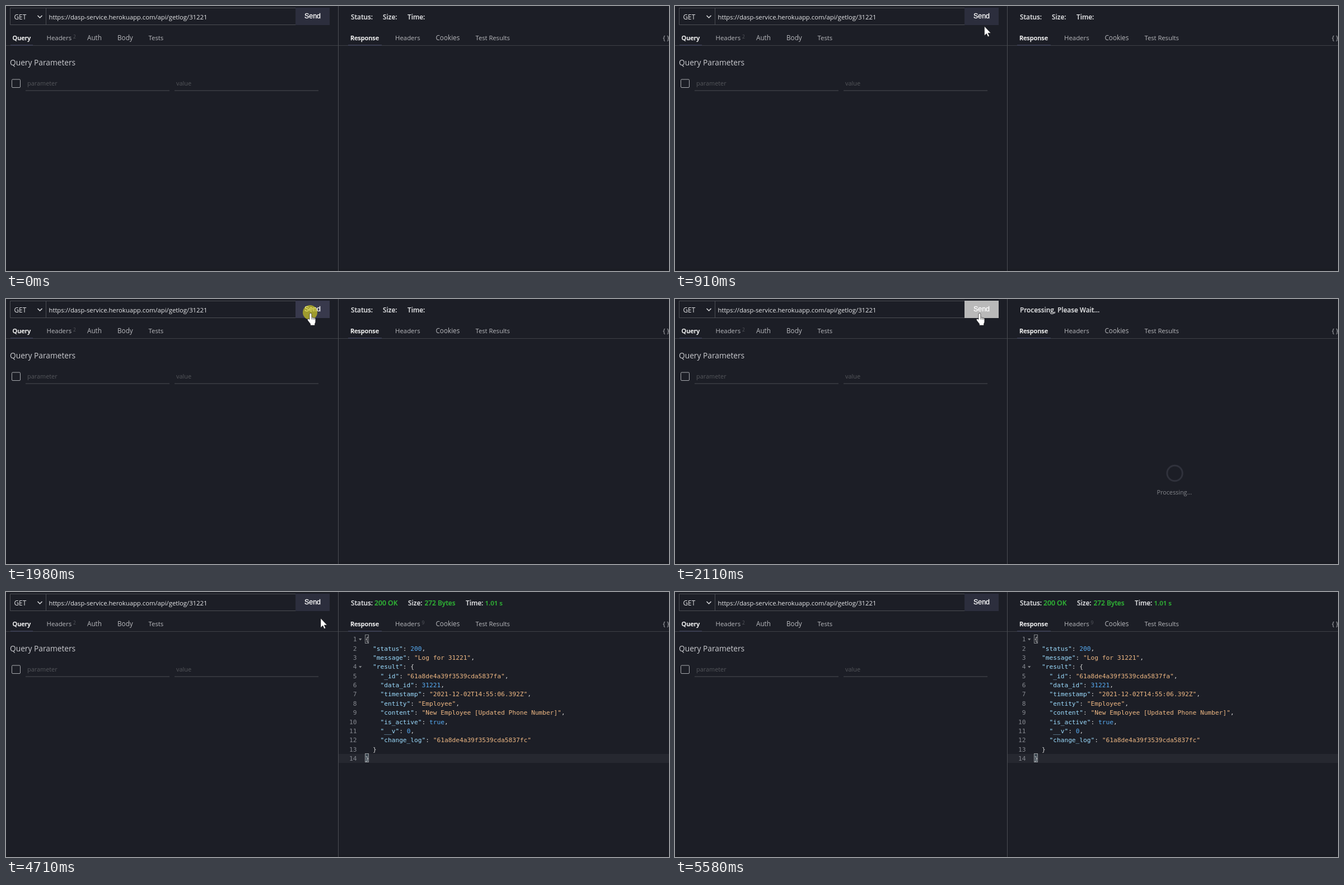
Animation of 1184 by 473 pixels, one loop 7060 ms. Source, as an HTML page:

```html
<!DOCTYPE html>
<html lang="en">
<head>
<meta charset="utf-8">
<title>API request</title>
<style>
  html, body { margin: 0; height: 100%; overflow: hidden; background: #1c1e26; }
  svg { display: block; width: 1184px; height: 473px; }
  text { font: 11.4px "Open Sans", "Noto Sans", sans-serif; fill: #b8b9bd; white-space: pre; }
  .bright { fill: #e6e7e9; }
  .active { font-size: 11px; font-weight: 600; fill: #fff; stroke: #fff; stroke-width: .25px; }
  .status text { font-size: 11.8px; font-weight: 600; fill: #dedfe1; stroke: #dedfe1; stroke-width: .15px; }
  .status .ok { fill: #30b636; stroke: #30b636; }
  .status .plain { font-size: 10.8px; font-weight: 400; fill: #85878c; stroke: none; }
  .count { font-size: 8.4px; fill: #55575d; }
  .hint { font-size: 10.9px; fill: #54565b; }
  .title { font-size: 13.75px; fill: #cbccd0; }
  .send { font: 12.4px "Liberation Sans", Arial, sans-serif; fill: #fff; stroke: #fff; stroke-width: .3px; }
  .code text { font: 11.2px "DejaVu Sans Mono", monospace; fill: #d4d4d4; }
  .code .num { fill: #868990; text-anchor: end; }
  .code .key { fill: #9cdcfe; }
  .code .str { fill: #f0b984; }
  .code .lit { fill: #58aef6; }
  .line { fill: none; stroke: #4b4d53; }
  .rule { stroke: #3d4046; }
  .mark { fill: #3a3d50; }
</style>
</head>
<body>
<svg viewBox="0 0 1184 473">
  <rect width="1184" height="473" fill="#1c1e26"/>
  <rect y="469" width="1184" height="4" fill="#1a1c23"/>

  <path d="M517 3.5H7.5V33.5H517M71.5 3V34" class="line"/>
  <text x="14.5" y="23.5" class="bright" style="font-size:11.8px">GET</text>
  <path d="M56.5 17l4 4 4-4" fill="none" stroke="#dcdddf" stroke-width="1.5"/>
  <text x="76.5" y="23.5" class="bright" style="font-size:11.27px">https://dasp-service.herokuapp.com/api/getlog/31221</text>
  <rect id="button" x="517" y="3" width="61" height="31"/>
  <text x="533" y="22" class="send">Send</text>

  <path d="M0 70.5H1184" class="line rule"/>
  <path d="M593.5 0V473" class="line"/>
  <rect x="8" y="69" width="40" height="2" class="mark"/>
  <rect x="611" y="69" width="60" height="2" class="mark"/>

  <text x="11.5" y="60.5" class="active">Query</text>
  <text x="72.5" y="60.5">Headers</text>
  <text x="120" y="57.5" class="count">2</text>
  <text x="145" y="60.5" style="font-size:11.7px">Auth</text>
  <text x="199" y="60.5" style="font-size:11.7px">Body</text>
  <text x="254.5" y="60.5">Tests</text>

  <text x="7" y="106" class="title">Query Parameters</text>
  <rect x="10.5" y="131" width="15" height="14.5" rx="1.5" fill="none" stroke="#a9abaf"/>
  <text x="38" y="142" class="hint">parameter</text>
  <text x="304" y="142" class="hint">value</text>
  <path d="M35 151H292M301 151H558" class="line"/>

  <text x="615" y="60.5" class="active">Response</text>
  <text x="695" y="60.5">Headers</text>
  <text x="767.5" y="60.5" style="font-size:11.7px">Cookies</text>
  <text x="838.5" y="60.5" style="font-size:11.2px">Test Results</text>
  <text x="1173" y="60.5">{ }</text>

  <g id="idle" class="status">
    <text x="616" y="24">Status:</text>
    <text x="673" y="24">Size:</text>
    <text x="717" y="24">Time:</text>
  </g>

  <g id="wait" class="status">
    <text x="616" y="24">Processing, Please Wait...</text>
    <circle cx="892.5" cy="311" r="13.7" fill="none" stroke="#30323c" stroke-width="3"/>
    <text x="860.5" y="349" class="plain">Processing...</text>
  </g>

  <g id="done">
    <g class="status">
      <text x="616" y="24">Status:</text>
      <text x="658" y="24" class="ok" style="font-size:12.2px">200 OK</text>
      <text x="718" y="24">Size:</text>
      <text x="747.5" y="24" class="ok" style="font-size:11.9px">272 Bytes</text>
      <text x="821" y="24">Time:</text>
      <text x="855.5" y="24" class="ok" style="font-size:11.5px">1.01 s</text>
    </g>
    <text x="742.5" y="57.5" class="count">9</text>
    <rect x="594" y="289" width="590" height="16" fill="#262830"/>
    <rect x="641.5" y="76.5" width="6" height="15" fill="none" stroke="#85888c"/>
    <rect x="641.5" y="288.5" width="6" height="15" fill="#3b4650" stroke="#9a9da1"/>
    <path d="M630 83h5.4l-2.7 3.4zM630 132.2h5.4l-2.7 3.4z" fill="#85888c"/>
    <g id="code" class="code"></g>
  </g>

  <circle id="click" cx="543" cy="24" r="13" fill="#d4ce1e" opacity=".66"/>
  <path id="arrow" d="M0 0V16.5L3.8 13 6.3 18.5 8.7 17.4 6.2 12H11.3Z" fill="#fff" stroke="#111" stroke-width=".5"/>
  <g id="hand">
    <path d="M4 2.2a1.9 1.9 0 0 1 3.8 0V7.6l4.8 1a2.6 2.6 0 0 1 2.2 2.6v4.3q0 1.8-1.2 3.4V22H5.6v-2.6L1 13.6Q-.4 11.4 1.2 10.4 2.4 9.8 4 11.6Z"
      fill="#fff" stroke="#111" stroke-width=".6"/>
    <path d="M7.9 8v3.6M10.3 8.6v3.2M12.6 9.2v2.8" stroke="#333" stroke-width=".8"/>
  </g>
</svg>
<script>
  const LOOP = 7060, STEP = 46.1;
  const $ = id => document.getElementById(id);
  const show = (id, on) => $(id).style.display = on ? '' : 'none';
  const place = (id, x, y) => $(id).setAttribute('transform', `translate(${x.toFixed(2)} ${y.toFixed(2)})`);

  const json = JSON.stringify({
    status: 200,
    message: 'Log for 31221',
    result: {
      _id: '61a8de4a39f3539cda5837fa',
      data_id: 31221,
      timestamp: '2021-12-02T14:55:06.392Z',
      entity: 'Employee',
      content: 'New Employee [Updated Phone Number]',
      is_active: true,
      __v: 0,
      change_log: '61a8de4a39f3539cda5837fc'
    }
  }, null, 2);

  function paint(line) {
    return line.replace(/("[^"]*")(:?)|\b(true|\d+)\b/g, (m, str, colon, lit) => {
      const kind = lit ? 'lit' : colon ? 'key' : 'str';
      return `<tspan class="${kind}">${lit || str}</tspan>${colon || ''}`;
    });
  }

  $('code').innerHTML = json.split('\n').map((line, i) => {
    const y = 88.2 + i * 16.38, body = line.trimStart();
    const x = 641.5 + (line.length - body.length) * 6.74;
    return `<text class="num" x="626.5" y="${y}">${i + 1}</text><text x="${x}" y="${y}">${paint(body)}</text>`;
  }).join('');

  const snap = (t, from) => from + Math.floor((t - from) / STEP + .1) * STEP;

  function enter(t) {
    const u = Math.min(1, (snap(t, 400) - 400) / 790);
    const left = (1 - u ** 1.5) ** 4.91;
    return [543 + 332 * left, 25 + 392 * left];
  }

  function leave(t) {
    const u = (snap(t, 4710) - 4710) / 830;
    const s = .75 * u * (1 - u) ** 2 + u * u * (3 - 2 * u) - .38 * u * u * (1 - u);
    const r = 1 - s;
    const bez = (a, b, c, d) => a * r ** 3 + 3 * b * s * r * r + 3 * c * s * s * r + d * s ** 3;
    return [bez(562, 700, 980, 1113), bez(47, 205, 411, 471)];
  }

  function draw() {
    const t = performance.now() % LOOP;
    const within = (a, b) => t >= a && t < b;
    const waiting = within(2110, 3210);
    const [x, y] = t < 4710 ? enter(Math.max(t, 400)) : leave(t);
    const hover = within(400, 4710) && y < 34;

    show('idle', t < 2110);
    show('wait', waiting);
    show('done', t >= 3210);
    show('click', within(1980, 2060));
    show('hand', hover);
    show('arrow', within(400, 5580) && !hover);
    place('hand', x - 5, y);
    place('arrow', x, y);
    $('button').setAttribute('fill', waiting ? '#b9b9b9' : hover ? '#38394c' : '#2c2e3d');
    requestAnimationFrame(draw);
  }
  draw();
</script>
</body>
</html>
```
